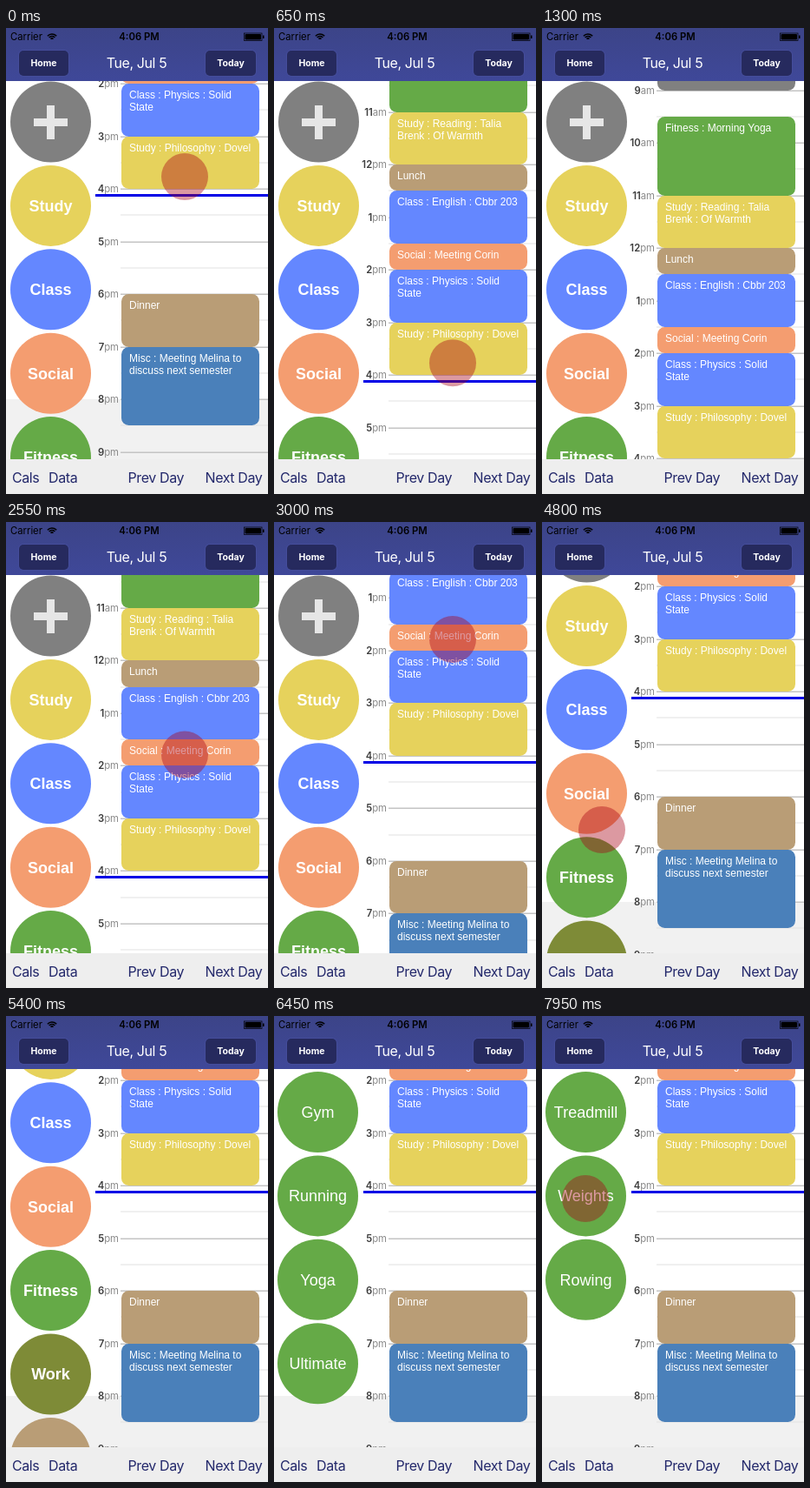
Write an HTML page with a canvas that moves like this. It is 302x536 px and loops after 8 s.

```html
<!DOCTYPE html>
<html lang="en">
<head>
<meta charset="utf-8">
<title>Day planner</title>
<style>
  html, body { margin: 0; width: 100%; height: 100%; overflow: hidden; background: #fff; }
  canvas { display: block; }
</style>
</head>
<body>
<canvas id="stage" width="302" height="536"></canvas>
<script>
const ctx = document.getElementById('stage').getContext('2d');
const LOOP = 8000, STEP = 50, HOUR = 60.5, SLIDE = 100;
const UI = 'Inter, sans-serif', BODY = '"Liberation Sans", Arial, sans-serif';
const color = {
  add: '#808080', study: '#e6d25c', class: '#6487ff', social: '#f49d70',
  fitness: '#65aa47', work: '#7e8b37', meals: '#b99d76', misc: '#4a80ba'
};

// kind, start hour, end hour, lines of text
const events = [
  ['add', 8, 9],
  ['fitness', 9.5, 11, 'Fitness : Morning Yoga'],
  ['study', 11, 12, 'Study : Reading : Talia', 'Brenk : Of Warmth'],
  ['meals', 12, 12.5, 'Lunch'],
  ['class', 12.5, 13.5, 'Class : English : Cbbr 203'],
  ['social', 13.5, 14, 'Social : Meeting Corin'],
  ['class', 14, 15, 'Class : Physics : Solid', 'State'],
  ['study', 15, 16, 'Study : Philosophy : Dovel'],
  ['meals', 18, 19, 'Dinner'],
  ['misc', 19, 20.5, 'Misc : Meeting Melina to', 'discuss next semester']
];
const categories = [['add', '+'], ['study', 'Study'], ['class', 'Class'], ['social', 'Social'],
  ['fitness', 'Fitness'], ['work', 'Work'], ['meals', 'Meals'], ['misc', 'Misc']];
const green = names => names.map(name => ['fitness', name]);
const fitness = green(['Gym', 'Running', 'Yoga', 'Ultimate']);
const gym = green(['Treadmill', 'Weights', 'Rowing']);

// Decelerating progress from 0 to 1
const ease = (t, start, end) =>
  1 - (1 - Math.min(1, Math.max(0, (t - start) / (end - start)))) ** 1.6;

function rect(x, y, w, h, fill, radius = 0) {
  ctx.fillStyle = fill;
  ctx.beginPath();
  ctx.roundRect(x, y, w, h, radius);
  ctx.fill();
}

function disc(x, y, r, fill) {
  ctx.fillStyle = fill;
  ctx.beginPath();
  ctx.arc(x, y, r, 0, 7);
  ctx.fill();
}

function text(str, x, y, font, fill, align = 'left', spacing = 0) {
  ctx.font = font;
  ctx.fillStyle = fill;
  ctx.textAlign = align;
  ctx.letterSpacing = spacing + 'px';
  ctx.fillText(str, x, y);
}

function drawDay(twoPm) {
  const yAt = hour => Math.round(twoPm + (hour - 14) * HOUR);
  rect(0, yAt(20), 302, 400, '#f1f1f1');
  for (let h = 8; h < 23; h++) {
    const y = yAt(h), suffix = h < 12 ? 'am' : 'pm';
    rect(132, y - 0.5, 170, 1.5, '#c4c4c4');
    rect(132, yAt(h + 0.5) - 0.5, 170, 1, '#e2e2e2');
    text(suffix, 130, y + 3.5, `11.3px ${UI}`, '#8a8a8a', 'right');
    const width = ctx.measureText(suffix).width;
    text((h + 11) % 12 + 1, 130 - width, y + 3.5, `600 11.3px ${UI}`, '#3c3c3c', 'right');
  }
  for (const [kind, start, end, ...lines] of events) {
    const y = yAt(start);
    rect(133, y, 159, yAt(end) - y, color[kind], 8.5);
    lines.forEach((line, i) => text(line, 142, y + 17 + 14 * i, `12px ${BODY}`, '#fff'));
  }
  rect(103, yAt(16) + 6, 199, 3, '#0000e6');
}

function drawColumn(items, x, top, weight) {
  items.forEach(([kind, label], i) => {
    const y = top + i * 96.4;
    disc(x, y, 46.5, color[kind]);
    if (kind === 'add') {
      rect(x - 19.5, y - 4, 39, 9, '#e6e6e6');
      rect(x - 4.5, y - 19, 9, 39, '#e6e6e6');
    } else {
      text(label, x, y + 6.3, `${weight} 18px ${BODY}`, '#fff', 'center');
    }
  });
}

function drawButton(label, x, w) {
  rect(x - 1, 25, w + 2, 31, '#454d9b', 6);
  rect(x, 26, w, 29, '#262a5e', 5);
  text(label, x + w / 2, 44, `700 10.5px ${UI}`, '#fff', 'center');
}

function drawBars() {
  const shade = ctx.createLinearGradient(0, 0, 0, 61);
  shade.addColorStop(0, '#3c4488');
  shade.addColorStop(1, '#3f4899');
  rect(0, 0, 302, 61, shade);
  text('Carrier', 5, 14, `11.3px ${UI}`, '#000');
  text('4:06 PM', 153.5, 14, `600 11.3px ${UI}`, '#000', 'center');
  ctx.strokeStyle = '#000';
  ctx.lineWidth = 1.5;
  for (const r of [2, 4.5, 7]) {
    ctx.beginPath();
    ctx.arc(53, 14, r, -Math.PI * 0.76, -Math.PI * 0.24);
    ctx.stroke();
  }
  ctx.lineWidth = 0.7;
  ctx.strokeRect(274.5, 6, 20.5, 8.5);
  rect(275.5, 7, 18.5, 6.5, '#000', 1);
  rect(296, 8.5, 1.5, 3.5, '#000');
  drawButton('Home', 15, 57);
  drawButton('Today', 230, 58);
  text('Tue, Jul 5', 150.5, 46, `16px ${UI}`, '#fff', 'center', -0.4);

  rect(0, 496, 302, 40, '#eeeeee');
  for (const [label, x] of [['Cals', 7], ['Data', 49], ['Prev Day', 140.5], ['Next Day', 229.5]])
    text(label, x, 522.5, `16px ${UI}`, '#23286b', 'left', -0.4);
}

function draw(t) {
  const twoPm = 64 + 310 * ease(t, 0, 1250) - 300 * ease(t, 2300, 3500);
  const listScroll = 178 * ease(t, 4500, 5400);
  const toFitness = ease(t, 6150, 6450), toGym = ease(t, 7150, 7450);

  rect(0, 0, 302, 536, '#fff');
  drawDay(twoPm);
  if (toFitness < 1) drawColumn(categories, 51.5 - SLIDE * toFitness, 108 - listScroll, 'bold');
  if (toFitness > 0 && toGym < 1)
    drawColumn(fitness, 50.5 + SLIDE * (1 - toFitness - toGym), 110.5, 'normal');
  if (toGym > 0) drawColumn(gym, 50.5 + SLIDE * (1 - toGym), 110.5, 'normal');
  drawBars();

  // start, end, x, y of each finger contact
  const touches = [
    [0, 1300, 206, twoPm + 107],
    [2300, 3150, 206, twoPm - 13],
    [4500, 5250, 69, 439 - listScroll],
    [5900, 6150, 50, 320],
    [6950, 7150, 50, 114],
    [7950, LOOP, 50, 210]
  ];
  for (const [start, end, x, y] of touches)
    if (t >= start && t < end) disc(x, y, 27, 'rgba(168, 0, 20, 0.4)');
}

function tick() {
  const t = performance.now() % LOOP;
  draw(Math.floor(t / STEP) * STEP);
  requestAnimationFrame(tick);
}
tick();
</script>
</body>
</html>
```
